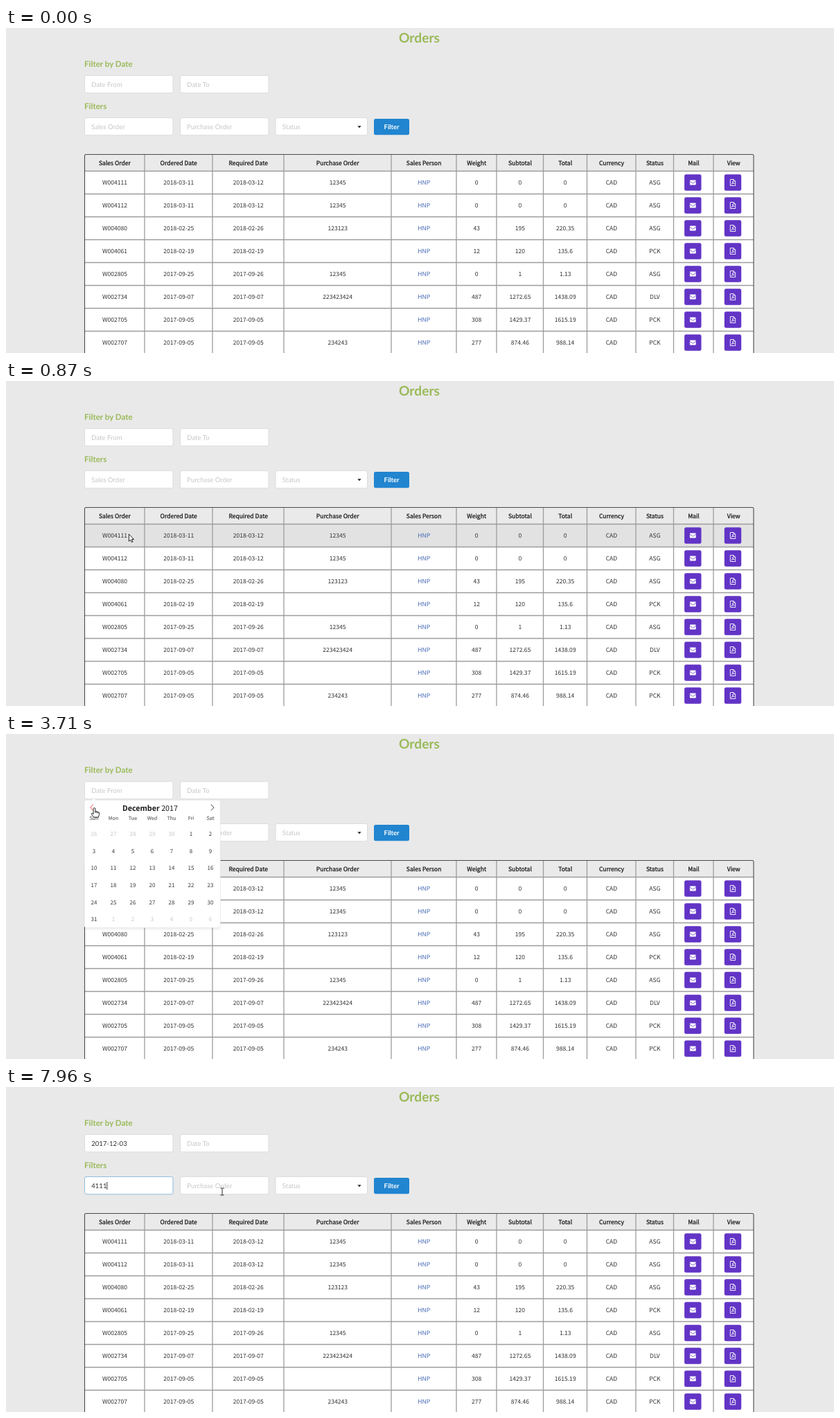
These frames come from a looping animation (1195 px wide and 469 px high, 8 s). An HTML page:

```html
<!DOCTYPE html>
<html lang="en">
<head>
<meta charset="utf-8">
<title>Orders</title>
<style>
  html, body { margin: 0; width: 100%; height: 100%; overflow: hidden; background: #e9e9e9; }
  svg { display: block; width: 1195px; height: 469px; }
  text { text-rendering: geometricPrecision; white-space: pre; }
  .lato { font-family: Lato, sans-serif; font-size: 9.56px; }
  .sans { font-family: "Noto Sans CJK JP", "Noto Sans CJK SC", "Noto Sans CJK", sans-serif; font-size: 8.57px; }
  .mid { text-anchor: middle; }
  .green { fill: #9aba59; font-weight: 700; }
  .head { fill: #161616; stroke: #161616; stroke-width: .25px; }
  .cell { fill: #333; }
  .link { fill: #4468b5; }
  .title { font-size: 10.75px; fill: #1c1c1c; }
  .week { font-size: 7.2px; fill: #707070; stroke: #707070; stroke-width: .2px; }
  .day { font-size: 8px; fill: #393939; }
  .day.out { fill: #c6c6c6; }
  .day.on { fill: #fff; }
</style>
</head>
<body>
<svg id="stage" viewBox="0 0 1195 469"></svg>
<script>
const LOOP = 8000;
const stage = document.getElementById('stage');

function el(parent, tag, attrs = {}, content) {
  const node = document.createElementNS('http://www.w3.org/2000/svg', tag);
  for (const k in attrs) node.setAttribute(k, attrs[k]);
  if (content !== undefined) node.textContent = content;
  parent.appendChild(node);
  return node;
}
const label = (parent, x, y, cls, content, more) =>
  el(parent, 'text', { x, y, class: cls, ...more }, content);
const box = (parent, x, y, width, height, fill, more) =>
  el(parent, 'rect', { x, y, width, height, fill, ...more });
const line = (parent, d, stroke, width = 1) =>
  el(parent, 'path', { d, fill: 'none', stroke, 'stroke-width': width });
const show = (node, on) => node.setAttribute('visibility', on ? 'visible' : 'hidden');

// Headings and filter form
label(stage, 596.5, 21.4, 'lato green mid', 'Orders', { style: 'font-size:19.2px' });
label(stage, 113, 56.2, 'lato green', 'Filter by Date', { style: 'font-size:11.6px' });
label(stage, 113, 116.7, 'lato green', 'Filters', { style: 'font-size:11.6px' });

function field(x, y, hint, width = 127.5) {
  const frame = box(stage, x + .5, y + .5, width, 25.3, '#fff', { rx: 2.5, stroke: '#dcdcdc' });
  const text = label(stage, x + 10.3, y + 16.7, 'lato', hint, { fill: '#c6c6c6' });
  return (value, focus) => {
    frame.setAttribute('stroke', focus ? '#8fbcdc' : '#dcdcdc');
    text.setAttribute('fill', value ? '#303030' : focus ? '#858585' : '#c6c6c6');
    text.textContent = value || hint;
  };
}
const dateFrom = field(113, 68, 'Date From');
field(251, 68, 'Date To');
const salesOrder = field(113, 129, 'Sales Order');
field(251, 129, 'Purchase Order');
field(388.5, 129, 'Status', 132.5);
el(stage, 'path', { d: 'M507.3 141.2h5.4l-2.7 3z', fill: '#222' });
box(stage, 531, 131, 51, 23.3, '#2185d0', { rx: 2.5 });
label(stage, 556.6, 146.1, 'lato mid', 'Filter', { fill: '#fff', 'font-weight': 700, style: 'font-size:9.4px' });
const caret = box(stage, 123, 137, .9, 11, '#222');

// Orders table
const TOP = 206.5, ROW = 33;
const edges = [113.5, 200, 298, 401, 556, 650, 708, 775.5, 838.5, 909, 963.5, 1021, 1079];
const heads = 'Sales Order|Ordered Date|Required Date|Purchase Order|Sales Person|Weight|Subtotal|Total|Currency|Status|Mail|View'.split('|');
const orders = [
  'W004111|2018-03-11|2018-03-12|12345|0|0|0|ASG',
  'W004112|2018-03-11|2018-03-12|12345|0|0|0|ASG',
  'W004080|2018-02-25|2018-02-26|123123|43|195|220.35|ASG',
  'W004061|2018-02-19|2018-02-19||12|120|135.6|PCK',
  'W002805|2017-09-25|2017-09-26|12345|0|1|1.13|ASG',
  'W002734|2017-09-07|2017-09-07|223423424|487|1272.65|1438.09|DLV',
  'W002705|2017-09-05|2017-09-05||308|1429.37|1615.19|PCK',
  'W002707|2017-09-05|2017-09-05|234243|277|874.46|988.14|PCK'
];
const center = i => (edges[i] + edges[i + 1]) / 2 + .2;

function iconButton(x, y) {
  const g = el(stage, 'g', { transform: `translate(${x} ${y})` });
  box(g, -12.2, -11.8, 24.4, 23.6, '#6234c6', { rx: 2.5 });
  return g;
}
function mailButton(x, y) {
  const g = iconButton(x, y);
  box(g, -4.4, -3.4, 8.8, 6.9, '#fff', { rx: .8 });
  line(g, 'M-4.6 -2L-.8 .8Q0 1.3 .8 .8L4.6 -2', '#6234c6', .8);
}
function fileButton(x, y) {
  const g = iconButton(x, y);
  line(g, 'M-3.7 -4.5H1L3.7 -1.9V4.5H-3.7ZM1 -4.5V-1.9H3.7', '#fff', .9);
  line(g, 'M-2.1 3.1Q.2 .6 -.4 -1.9Q.2 1.3 2.4 1.5Q0 .9 -1.8 2.3', '#fff', .7);
}

box(stage, 113.5, 182.5, 965.5, 24, '#ebeaea', { rx: 2 });
const bands = orders.map((_, r) => box(stage, 113.5, TOP + r * ROW, 965.5, ROW, '#fff'));
heads.forEach((h, i) => label(stage, center(i), 198.2, 'sans head mid', h));
for (let r = 0; r < orders.length; r++) line(stage, `M113.5 ${TOP + r * ROW}H1079`, '#9c9c9c', 1.3);
edges.slice(1, -1).forEach(x => line(stage, `M${x} 183V469`, '#9c9c9c', 1.3));
line(stage, 'M113.5 470V184.5q0 -2 2 -2H1077q2 0 2 2V470', '#4a4a4a', 1.1);
orders.forEach((order, r) => {
  const cells = order.split('|');
  cells.splice(4, 0, 'HNP');
  cells.splice(8, 0, 'CAD');
  const y = TOP + 16.5 + r * ROW;
  cells.forEach((c, i) => label(stage, center(i), y + 3.1, `sans mid ${i === 4 ? 'link' : 'cell'}`, c));
  mailButton(991.3, y);
  fileButton(1049, y);
});

// Date picker
const dayX = c => 127 + 28 * c, dayY = r => 143.9 + 24.7 * r;
const picker = el(stage, 'g');
box(picker, 112.5, 96, 197, 186, '#000', { rx: 4, opacity: .035 });
box(picker, 112, 97, 198, 187, '#000', { rx: 5, opacity: .02 });
box(picker, 113, 95.5, 196.3, 184, '#fff', { rx: 3.2, stroke: '#e4e4e4', 'stroke-width': .6 });
el(picker, 'path', { d: 'M123.8 95.9l3.2 -3.4 3.2 3.4z', fill: '#fff' });
line(picker, 'M123.8 95.3l3.2 -3 3.2 3', '#dfdfdf', .6);
const prev = line(picker, 'M126 101.8l-4.3 4.3 4.3 4.3', '#444');
line(picker, 'M295.8 101.8l4.3 4.3 -4.3 4.3', '#444');
'Sun Mon Tue Wed Thu Fri Sat'.split(' ').forEach((d, c) => label(picker, dayX(c), 124.4, 'sans week mid', d));
const hoverDay = el(picker, 'circle', { r: 12.4, fill: '#e6e6e6' });
const pickedDay = el(picker, 'circle', { cx: dayX(0), cy: dayY(1), r: 12.4, fill: '#569ff7' });

function monthPage(year, month, name) {
  const g = el(picker, 'g');
  const title = label(g, 208, 111, 'sans title mid');
  el(title, 'tspan', { 'font-weight': 700 }, name + ' ');
  el(title, 'tspan', {}, year);
  const lead = new Date(year, month, 1).getDay();
  for (let i = 0; i < 42; i++) {
    const date = new Date(year, month, 1 - lead + i);
    const x = dayX(i % 7), y = dayY(Math.floor(i / 7));
    const on = date.getFullYear() === 2018 && date.getMonth() === 1 && date.getDate() === 4;
    if (on) el(g, 'circle', { cx: x, cy: y, r: 12.4, fill: '#569ff7' });
    const state = on ? 'on' : date.getMonth() === month ? '' : 'out';
    label(g, x, y + 2.9, `sans day mid ${state}`, date.getDate());
  }
  return g;
}
const pages = [monthPage(2018, 1, 'February'), monthPage(2018, 0, 'January'), monthPage(2017, 11, 'December')];

// Pointer
const pointer = el(stage, 'g');
const shape = d => el(pointer, 'path', {
  d, fill: '#fff', stroke: '#111', 'stroke-width': .9, 'stroke-linejoin': 'round'
});
const pointers = {
  arrow: shape('M.4 .4V10.8L2.8 8.6L4.4 12.2L6 11.5L4.5 8H7.5Z'),
  text: line(pointer, 'M-2.6 -5H-.6L0 -4.5L.6 -5H2.6M0 -4.5V4.5M-2.6 5H-.6L0 4.5L.6 5H2.6', '#111', .9),
  hand: shape('M-1.4 1.3Q-1.4 0 0 0T1.4 1.3V5Q2.8 4.3 3.5 5.5Q4.9 4.9 5.4 6.2Q7 6 7 7.6V10L5.8 13.5H-.8L-3.9 9.3Q-4.5 7.6 -2.8 7.8L-1.4 9ZM1.4 5V7.4M3.5 5.5V7.6M5.4 6.2V7.8')
};
// time, x, y
const path = [
  [500, 171, 425], [639, 171, 425], [640, 168.5, 314], [870, 177, 220.5], [1100, 189, 140],
  [1380, 200, 84.6], [1760, 200, 84.6], [2150, 148, 103], [2550, 131, 107.3], [2580, 131, 107.3],
  [2660, 127.5, 106.6], [4060, 127.5, 106.6], [4670, 136, 168], [5390, 136, 168],
  [5680, 137, 148.5], [5890, 137, 148.5], [5980, 137, 145], [7740, 137, 145], [7960, 312, 151]
];
const STEP = 46;

function pointerAt(t) {
  let i = path.length - 1;
  while (i > 0 && path[i][0] > t) i--;
  const a = path[i], b = path[i + 1] || a;
  const span = b[0] - a[0] || 1;
  const p = Math.floor((t - a[0]) / STEP) * STEP / span;
  return b === a ? [a[1], a[2]] : [a[1] + (b[1] - a[1]) * p, a[2] + (b[2] - a[2]) * p];
}

const rowAt = y => Math.floor((y - TOP) / ROW);

function pointerKind(x, y, open) {
  if (y < 94) return 'hand';
  if (open) return y > 131 || (x < 134 && y < 118) ? 'hand' : 'arrow';
  if (y > 129 && y < 155) return 'text';
  const mid = y > TOP ? TOP + 16.5 + rowAt(y) * ROW : 195;
  const inWord = y > TOP ? x > 139 && x < 175 : x > 134 && x < 180;
  return inWord && Math.abs(y - mid) < 9 || y > 420 ? 'text' : 'arrow';
}

const keyTimes = [6410, 6720, 7100, 7590];

function draw(t) {
  const open = t >= 1760 && t < 5150;
  const [x, y] = pointerAt(t);
  const visible = t >= 500;

  const hovered = !visible || open ? -1 : t < 640 ? 7 : rowAt(y);
  bands.forEach((b, r) => b.setAttribute('fill', r === hovered ? '#e2e2e2' : '#fff'));

  const picked = t >= 5090;
  dateFrom(picked ? '2017-12-03' : '', (t >= 1760 && t < 2840) || (picked && t < 5890));
  const typed = '4111'.slice(0, keyTimes.filter(k => t >= k).length);
  salesOrder(typed, t >= 5890);
  show(caret, t >= 5980);
  caret.setAttribute('x', 123.2 + 5.55 * typed.length);

  picker.setAttribute('display', open ? 'inline' : 'none');
  if (open) {
    const rest = (1 - Math.min(1, (t - 1760) / 220)) ** 3;
    picker.setAttribute('opacity', 1 - .15 * rest);
    picker.setAttribute('transform', `translate(0 ${-2.4 * rest})`);
    const page = t < 2840 ? 0 : t < 3710 ? 1 : 2;
    pages.forEach((g, i) => g.setAttribute('display', i === page ? 'inline' : 'none'));
    prev.setAttribute('stroke', x < 134 && y < 118 ? '#f64747' : '#444');
    const c = Math.round((x - dayX(0)) / 28), r = Math.round((y - dayY(0)) / 24.7);
    show(hoverDay, y > 131.5);
    hoverDay.setAttribute('cx', dayX(c));
    hoverDay.setAttribute('cy', dayY(r));
    show(pickedDay, picked);
  } else {
    show(hoverDay, false);
    show(pickedDay, false);
  }

  pointer.setAttribute('display', visible ? 'inline' : 'none');
  pointer.setAttribute('transform', `translate(${x} ${y})`);
  const kind = pointerKind(x, y, open);
  for (const k in pointers) pointers[k].setAttribute('display', k === kind ? 'inline' : 'none');
}

const start = performance.now();
function tick() {
  draw((performance.now() - start) % LOOP);
  requestAnimationFrame(tick);
}
tick();
</script>
</body>
</html>
```
